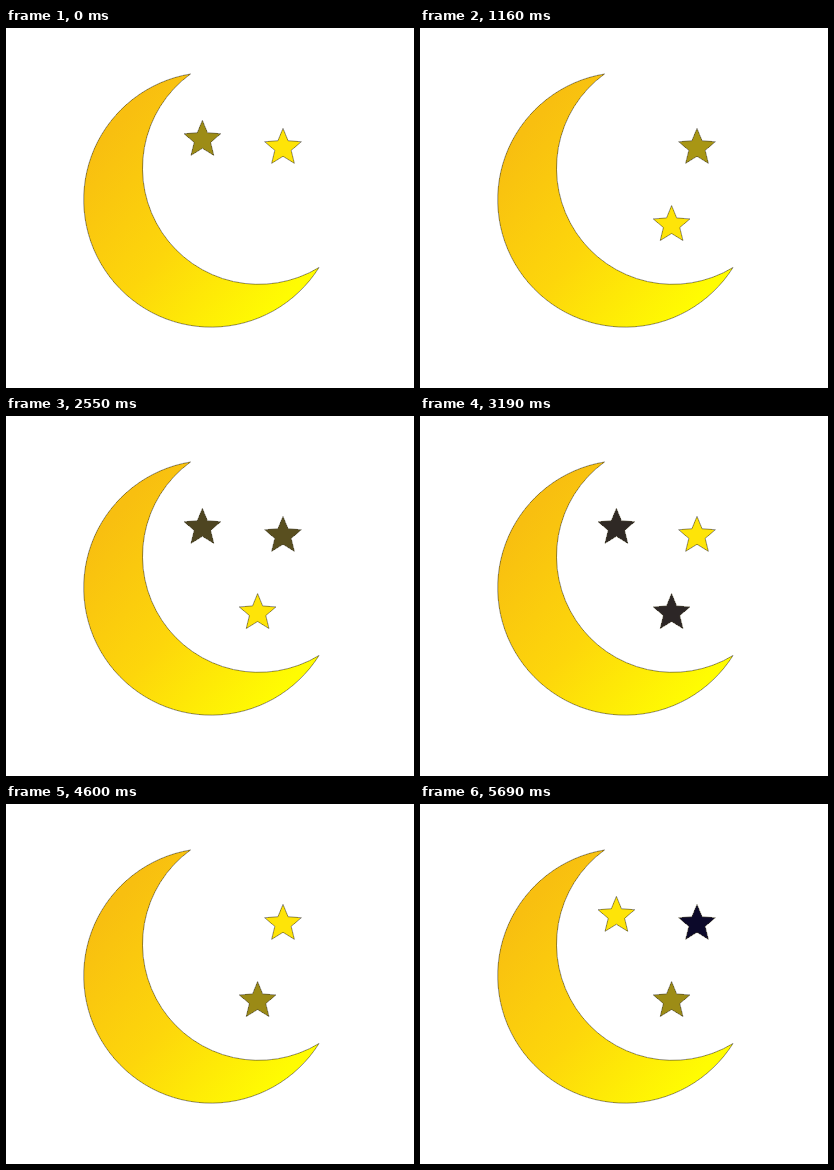
An HTML page that plays this animation: 408 by 360 pixels, repeating every 5740 ms.

```html
<!DOCTYPE html>
<html lang="en">
<head>
<meta charset="utf-8">
<title>Moon and stars</title>
<style>
html, body { margin: 0; width: 100%; height: 100%; overflow: hidden; background: #fff; }
svg { display: block; width: 408px; height: 360px; }
path { stroke: #4a4632; stroke-width: .6; stroke-linejoin: round; shape-rendering: crispEdges; }
</style>
</head>
<body>
<svg id="sky" viewBox="0 0 408 360">
  <defs>
    <linearGradient id="gold" gradientUnits="userSpaceOnUse" x1="90" y1="120" x2="270" y2="280">
      <stop offset="0" stop-color="#f8bf10"/>
      <stop offset=".5" stop-color="#fdd60b"/>
      <stop offset="1" stop-color="#fffc02"/>
    </linearGradient>
  </defs>
  <path fill="url(#gold)" d="M184.5 46A127.4 127.4 0 1 0 313 239.5A116.24 116.24 0 0 1 184.5 46Z"/>
</svg>
<script>
const LOOP = 5740, LAST = 5690;
const PERIOD = 1660, DIM = 969, GONE = 1295;
const NIGHT = [12, 9, 42], GOLD = [254, 228, 8];
const sky = document.getElementById('sky');

function starPath(cx, cy) {
  const points = Array.from({ length: 10 }, (_, i) => {
    const r = i % 2 ? 8.6 : 19.3, a = (i / 5 - .5) * Math.PI;
    return (cx + r * Math.cos(a)).toFixed(2) + ' ' + (cy + r * Math.sin(a)).toFixed(2);
  });
  return 'M' + points.join('L') + 'Z';
}

function addStar(x, y, shift) {
  const el = document.createElementNS('http://www.w3.org/2000/svg', 'path');
  el.setAttribute('d', starPath(x, y));
  sky.append(el);
  return { el, shift };
}

const stars = [addStar(196.4, 111.7, 255), addStar(277, 119.7, 955), addStar(251.6, 196.9, 1353)];

const ramp = (p, from, to) => Math.min(1, Math.max(0, (p - from) / (to - from)));

// Glow up to olive, rest, flare to gold, drop back to olive, fade out
function light(p) {
  return p < DIM
    ? .6 * ramp(p, 0, 255) ** 2 + .4 * ramp(p, 445, 545)
    : .6 * (1 - ramp(p, DIM, GONE));
}

function draw(now) {
  const t = Math.min(now % LOOP, LAST);
  for (const { el, shift } of stars) {
    const p = (t + shift) % PERIOD, k = light(p);
    el.style.visibility = p < GONE ? 'visible' : 'hidden';
    el.style.fill = `rgb(${NIGHT.map((c, i) => Math.round(c + (GOLD[i] - c) * k))})`;
  }
}

const start = performance.now();
function tick() {
  draw(performance.now() - start);
  requestAnimationFrame(tick);
}
tick();
</script>
</body>
</html>
```
